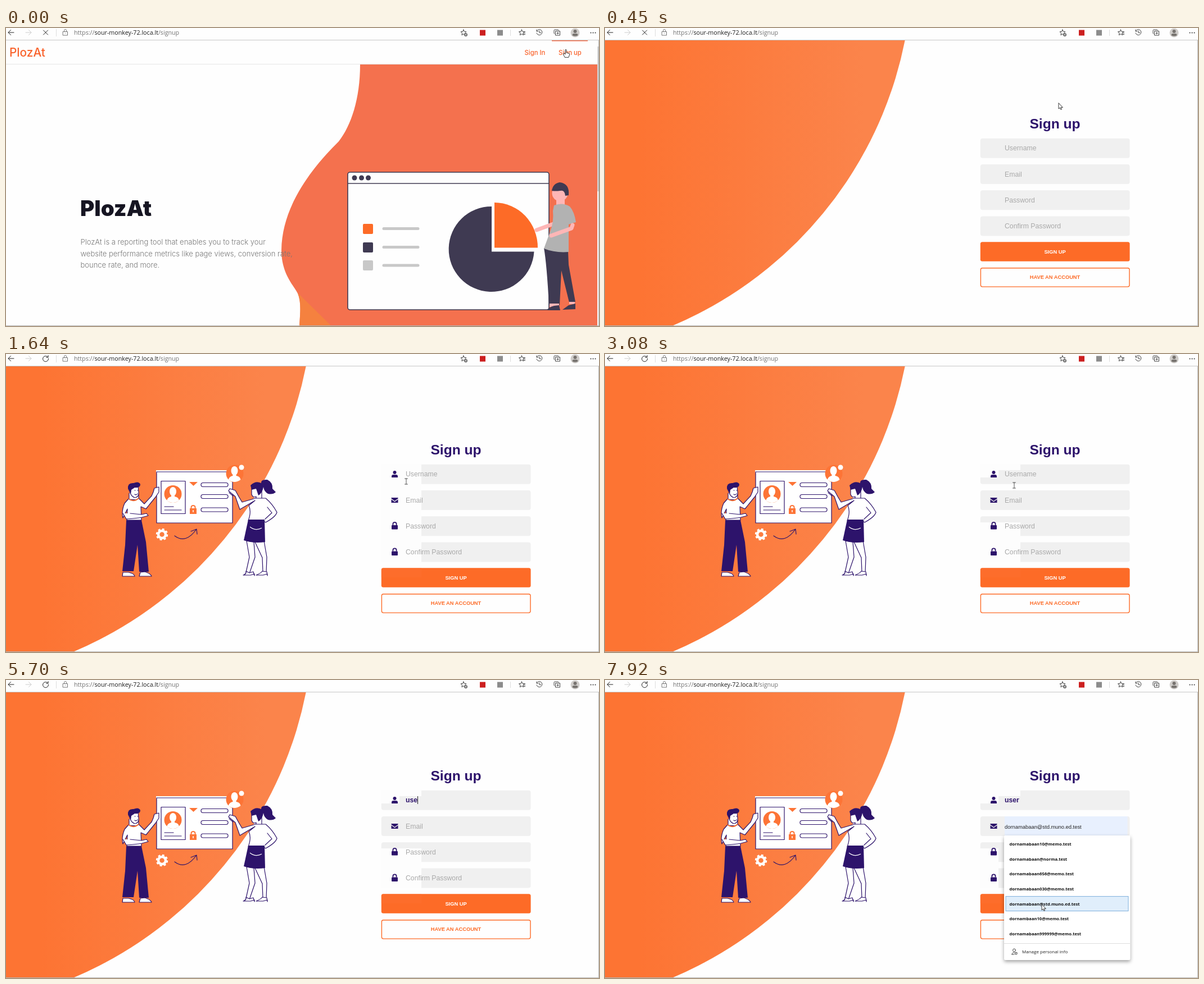
Animation, 1055 px wide and 531 px high, one loop 8000 ms. Source, as an HTML page:

```html
<!DOCTYPE html>
<html lang="en">
<head>
<meta charset="utf-8">
<title>Sign up walkthrough</title>
<style>
html, body { margin: 0; width: 100%; height: 100%; overflow: hidden; background: #fefefe; }
svg { display: block; width: 1055px; height: 531px; }
text { white-space: pre; }
.ui { font: 8px "Open Sans", "Noto Sans", sans-serif; fill: #222; }
.mails { font-size: 7.6px; font-weight: 700; fill: #111; }
.form { font: 12.25px "Liberation Sans", Arial, sans-serif; fill: #a9a9a9; }
.brand { font-family: Inter, sans-serif; }
.mid { text-anchor: middle; font-weight: 700; }
.ink { fill: #2d136b; }
.line { fill: none; stroke: #2d136b; stroke-width: 1.2; stroke-linecap: round; stroke-linejoin: round; }
.sketch { fill: #fff; stroke: #2d136b; stroke-width: 1.2; stroke-linejoin: round; stroke-linecap: round; }
.icon { fill: none; stroke: #444; stroke-width: 1; stroke-linecap: round; stroke-linejoin: round; }
.navy { fill: #3f3a52; }
.skin { fill: none; stroke: #feb6b6; stroke-width: 7; stroke-linecap: round; stroke-linejoin: round; }
.menu { filter: drop-shadow(0 3px 3px rgba(0, 0, 0, .36)); }
</style>
</head>
<body>
<svg viewBox="0 0 1055 531">
  <defs>
    <linearGradient id="sun" gradientUnits="userSpaceOnUse" x1="60" y1="0" x2="460" y2="0">
      <stop offset="0" stop-color="#fd7433"/><stop offset="1" stop-color="#fb844b"/>
    </linearGradient>
    <clipPath id="below"><rect y="22" width="1055" height="509"/></clipPath>
    <path id="star" d="M0-5 1.5-1.7 5-1.3 2.4 1 3.1 4.6 0 2.8-3.1 4.6-2.4 1-5-1.3-1.5-1.7Z"/>
    <g id="padlock"><rect x="-5.5" y="-1" width="11" height="7.5" rx="1"/><path d="M-3.1-1V-3a3.1 3.1 0 0 1 6.2 0v2" fill="none" stroke="#2d136b" stroke-width="1.8"/></g>
  </defs>
  <rect width="1055" height="531" fill="#fefefe"/>

  <g id="landing">
    <path d="M630 65C630 126 614 174 592 202C554 240 491 310 490 396C490 438 512 459 519 473C526 490 523 510 522 531H1052V65Z" fill="#f4714e"/>
    <path d="M519 472 579 531H522C523 510 526 490 519 472Z" fill="#f5813f"/>
    <rect id="smudge" x="969" y="65" width="32" height="16" fill="#f4625c"/>
    <path d="M0 64.5H1052" stroke="#e6e6e6"/>
    <path d="M971 22.5H1035" stroke="#f4714e" stroke-width="2"/>
    <path d="M1053.5 33V291" stroke="#c4c4c4" stroke-width="2"/>
    <g class="brand" fill="#f9632c">
      <text x="6" y="50.5" font-size="20.8" font-weight="500">PlozAt</text>
      <g font-size="11.3" font-weight="500"><text x="922.5" y="48">Sign In</text><text x="983" y="48">Sign up</text></g>
    </g>
    <text class="brand" x="132" y="335" font-size="38.5" font-weight="900" fill="#161522">PlozAt</text>
    <g class="brand" font-size="13" font-weight="300" fill="#777">
      <text x="132.5" y="385.5">PlozAt is a reporting tool that enables you to track your</text>
      <text x="132.5" y="406.5">website performance metrics like page views, conversion rate,</text>
      <text x="132.5" y="427">bounce rate, and more.</text>
    </g>
    <rect x="608" y="257" width="358" height="245" rx="4" fill="#fefefe" stroke="#3f3a52" stroke-width="1.6"/>
    <path d="M608 277H966" stroke="#3f3a52" stroke-width="1.6"/>
    <g class="navy"><circle cx="620" cy="267" r="4.5"/><circle cx="632.5" cy="267" r="4.5"/><circle cx="644.5" cy="267" r="4.5"/></g>
    <rect x="635" y="349" width="18" height="18" rx="2" fill="#fd6b27"/>
    <rect class="navy" x="635" y="382" width="18" height="18" rx="2"/>
    <rect x="635" y="414" width="18" height="18" rx="2" fill="#c8c8c8"/>
    <path d="M672 357.5H733M672 390.5H733M672 423H733" stroke="#c8c8c8" stroke-width="5" stroke-linecap="round"/>
    <path class="navy" d="M864 318A76 76 0 1 0 939.5 398.5H864Z"/>
    <path d="M869 311A77 80 0 0 1 946 391.5H869Z" fill="#fd6b27"/>
    <path class="skin" d="M974 349 944 360"/>
    <path d="M979 300V318H994V302" fill="#feb6b6"/>
    <circle cx="985.5" cy="294.5" r="14" fill="#feb6b6"/>
    <path class="navy" d="M971 290Q973 277 985 275Q1003 277 1001 298L995 299Q994 288 986 290Q977 291 971 290Z"/>
    <path class="navy" d="M957 392Q980 399 1000 398L1001 422 1013 488 1002 489 988 432 985 494H966Q962 420 957 392Z"/>
    <path d="M967 491H984V497H967ZM1002 488H1012V492H1002Z" fill="#feb6b6"/>
    <path class="navy" d="M963 503Q966 497 975 495L984 494 986 503ZM990 502 1001 494 1013 491V501Z"/>
    <path d="M975 316Q990 310 1003 318Q1011 327 1014 346L1001 350V399Q977 401 957 393L968 363Q975 345 973 326Z" fill="#b2b2b2"/>
    <path class="skin" d="M1008 351 1006 357 970 370"/>
  </g>

  <g id="signup" clip-path="url(#below)">
    <circle cx="-153" cy="-114" r="700" fill="url(#sun)"/>
    <g id="art">
      <path d="M267 207H403V212H267Z" fill="#fff"/>
      <rect class="sketch" x="268" y="210" width="135" height="91"/>
      <rect class="sketch" x="276" y="226.5" width="43" height="58"/>
      <circle cx="297" cy="249.5" r="15.5" fill="#fd7436"/>
      <g id="bust" fill="#fff"><ellipse cx="297" cy="245" rx="6" ry="8"/><path d="M286 261Q288 255 294 254V250H300V254Q307 255 308 261Q297 269 286 261Z"/></g>
      <path class="line" d="M282 272H298M282 278H312"/>
      <path d="M326 228H341L333.5 235Z" fill="#fd7436"/>
      <rect x="327" y="275" width="12" height="10" fill="#fd7436"/>
      <path d="M329.5 275V273a3.5 3 0 0 1 7 0v2" fill="none" stroke="#fd7436" stroke-width="2"/>
      <path d="M333 278V282" stroke="#fff" stroke-width="1.5"/>
      <g class="sketch"><rect x="347" y="229.5" width="48" height="7" rx="3.5"/><rect x="347" y="250.5" width="48" height="7" rx="3.5"/><rect x="347" y="274" width="48" height="7" rx="3.5"/></g>
      <circle cx="407" cy="213" r="15.5" fill="#fd7436"/>
      <use href="#bust" x="109.5" y="-37"/>
      <circle cx="419" cy="202" r="4.5" fill="#fff"/>
      <circle cx="277.5" cy="321.5" r="6.5" fill="none" stroke="#fff" stroke-width="4.5"/>
      <circle cx="277.5" cy="321.5" r="9.5" fill="none" stroke="#fff" stroke-width="2.5" stroke-dasharray="4 3.46"/>
      <path class="line" d="M300 324Q320 339 339 312M329 316 339 312 340 321"/>

      <path class="sketch" d="M219 248V259L236 260V250M208 389 207 396H229Q228 391 218 389ZM239 389 237 396H259Q257 391 247 388Z"/>
      <path class="sketch" d="M220 237Q219 252 229 256Q237 255 236 246L235 236Z"/>
      <path class="ink" d="M217 240Q216 229 227 230Q236 226 239 232Q239 239 229 238L223 242 222 250Z"/>
      <path class="line" d="M229 243H230M234 243H235M229 250Q232 252 234 249"/>
      <path class="sketch" d="M218 258Q227 264 236 257L246 267 259 253 262 246 264 239 272 237 272 246 266 255 249 276 240 272 241 296H215L216 276 208 292Q205 280 211 266Z"/>
      <path d="M218 258Q227 265 236 257" fill="none" stroke="#fd7436" stroke-width="2"/>
      <path class="sketch" d="M208 284 214 294Q230 293 242 291L253 288 250 284 241 286 221 284"/>
      <path class="ink" d="M214 296H241L249 335 254 388H237L234 340 227 387H207L212 340Z"/>

      <path class="sketch" d="M428 333 433 362 427 389 433 391 443 362 441 335ZM443 335 456 363 457 389 463 389 464 362 459 333Z"/>
      <path class="sketch" d="M427 387Q428 392 422 394H435L442 392V395L440 388 433 390ZM456 387Q453 391 445 394H457L465 392V395L464 388Z"/>
      <path class="sketch" d="M437 238V250Q439 257 445 254V262H455L455 242Z"/>
      <path class="ink" d="M435 234Q444 225 454 230Q453 223 465 224Q475 229 474 240L480 246Q475 251 466 249Q459 245 458 237Q456 248 449 252L445 240 437 242Z"/>
      <path class="sketch" d="M443 261 416 277 408 254 396 244 398 240 408 243 414 254 420 264 444 257H462Q474 267 482 282Q480 290 462 300L457 297H431Q437 281 432 270Z"/>
      <path class="line" d="M465 273 473 283 461 294M397 247 404 253"/>
      <path class="ink" d="M431 295H460L461 335Q441 338 423 332Z"/>
      <path d="M434 308Q444 316 455 310" fill="none" stroke="#fff" stroke-width="1.2"/>
    </g>
    <text class="form mid" x="800.5" y="178.8" style="font-size:24.6px;fill:#2d136b">Sign up</text>
    <g fill="#f0f0f0" id="fields"></g>
    <rect x="667.8" y="381.3" width="265.8" height="34.5" rx="3.5" fill="#fd6b27"/>
    <rect x="668.4" y="427.7" width="264.6" height="33.4" rx="3" fill="#fefefe" stroke="#fd6b27" stroke-width="1.4"/>
    <g class="form mid"><text x="800.5" y="401.7" style="font-size:9.3px;fill:#fff">SIGN UP</text><text x="800.5" y="447" style="font-size:9.3px;fill:#fd6b27">HAVE AN ACCOUNT</text></g>
    <path id="bleach" fill="#fdfdfd"/>
    <path id="glow" d="M671 381.300H739V398H667.800V384.500Q667.800 381.300 671 381.300Z" fill="#fd7130" fill-opacity=".5"/>
    <rect id="preview" x="711" y="243" width="218.500" height="35" fill="#e8f0fe"/>
    <g class="form">
      <text id="name" x="711" y="218">Username</text><text id="mail" x="711" y="264.5">Email</text>
      <text x="711" y="310.5">Password</text><text x="711" y="357">Confirm Password</text>
    </g>
    <path id="caret" stroke="#222" stroke-width="1"/>
    <g id="glyphs" class="ink">
      <circle cx="691.5" cy="211" r="3"/><path d="M686 220V218Q686 215 689 215H694Q697 215 697 218V220Z"/>
      <path d="M685.5 256H697.5V257.5L691.5 262 685.5 257.5ZM685.5 259 691.5 263.5 697.5 259V265H685.5Z"/>
      <use href="#padlock" x="691.5" y="306"/><use href="#padlock" x="691.5" y="352.5"/>
    </g>

    <g id="nameMenu">
      <rect class="menu" x="710" y="231" width="224.5" height="60" rx="2" fill="#fff"/>
      <path d="M710 261.5H934" stroke="#ddd"/>
      <text class="ui" x="719.5" y="249">Dornam</text>
      <path d="M916.5 246.5h.01M920 246.5h.01M923.5 246.5h.01" stroke="#222" stroke-width="2" stroke-linecap="round"/>
      <path class="icon" d="M724 280 729 275Q728 271 732 271.5L730.5 274 732 275.5 733.5 274Q734 278 730 277L725.5 281.5Z"/>
      <text class="ui" x="742" y="279.5">Manage passwords</text>
    </g>
    <g id="mailMenu">
      <rect class="menu" x="710" y="277" width="224.5" height="222" rx="2" fill="#fff"/>
      <path d="M710 469.5H934" stroke="#ddd"/>
      <rect id="pick" x="713" width="218" height="26" fill="#e0eefb" stroke="#7eb0dc"/>
      <g id="mails" class="ui mails"></g>
      <g class="icon"><circle cx="728" cy="481.5" r="2.5"/><path d="M724 489Q724 485.5 728 485.5M724 489H728M730 485.5H733V488.5H730Z"/></g>
      <text class="ui" x="742" y="487.3">Manage personal info</text>
    </g>
  </g>

  <g id="toolbar">
    <path d="M0 21.5H1055" stroke="#c6c6c6"/>
    <path class="icon" d="M4 8H14M8.5 3.5 4 8 8.5 12.5" style="stroke:#222"/>
    <path class="icon" d="M35 8H45M40.5 3.5 45 8 40.5 12.5" style="stroke:#ccc"/>
    <path id="stop" class="icon" d="M66.5 4 74.5 12M74.5 4 66.5 12" style="stroke:#222"/>
    <path id="reload" class="icon" d="M74.5 5.5A5 5 0 1 0 75.5 8M75 2.5V6H71.5" style="stroke:#222"/>
    <path d="M89.5 2V15M897.5 3V14" stroke="#ddd"/>
    <path class="icon" d="M101.5 6.5H109.5V13H101.5ZM103.5 6.5V4.5a2 2 0 0 1 4 0v2M105.5 9.5h.01" style="stroke:#777"/>
    <text class="ui" x="121" y="12.3" style="font-size:10.7px;fill:#707070">https://<tspan fill="#1d1d1d">sour-monkey-72.loca.lt</tspan>/signup</text>
    <use class="icon" href="#star" x="814" y="8"/>
    <circle cx="818" cy="12" r="3" fill="#666"/><path d="M816.5 12H819.5M818 10.5V13.5" stroke="#fff" stroke-width=".8"/>
    <rect x="843" y="3.5" width="10" height="10" fill="#cc1f1f"/>
    <rect x="874" y="3.5" width="10" height="10" fill="#8c8c8c"/>
    <use class="icon" href="#star" x="917.5" y="8"/><path d="M919.5 6.5H924M920.5 9H924M921 11.5H924" stroke="#444"/>
    <path class="icon" d="M944.5 5A5 5 0 1 1 944 9M944 3V6H947M949 5V8.5H951.5"/>
    <path class="icon" d="M978 5.5H985.5V13H978ZM976 10.5Q975 10 975 9V4.5Q975 3 976.5 3H982Q983 3 983 4M981.7 7.5V11M980 9.2H983.5"/>
    <circle cx="1012.5" cy="8.5" r="8" fill="#d0cdca"/>
    <g fill="#77736f"><circle cx="1012.5" cy="6" r="3"/><path d="M1007.5 13Q1007.5 10 1010 10H1015Q1017.5 10 1017.5 13Q1012.5 16 1007.5 13Z"/></g>
    <path d="M1040.5 8.5h.01M1044.5 8.5h.01M1048.5 8.5h.01" stroke="#333" stroke-width="2" stroke-linecap="round"/>
    <path d="M0 530.5H1055M1054.5 22V531" stroke="#b5b5b5" fill="none"/>
  </g>
  <path id="pointer" stroke-linejoin="round" stroke-linecap="round" stroke-width=".9"/>
</svg>

<script>
const LOOP = 8000;
const $ = id => document.getElementById(id);
const show = (id, on) => $(id).style.display = on ? "" : "none";
const at = (steps, t) => steps.findLast(([start]) => start <= t);

const mails = ["dornamabaan10@memo.test", "dornamabaan@norma.test", "dornamabaan656@memo.test",
  "dornamabaan030@memo.test", "dornamabaan@std.muno.ed.test", "dornambaan10@memo.test",
  "dornamabaan999999@memo.test"];
const rowY = i => 292 + 26.65 * i;
$("mails").innerHTML = mails.map((m, i) => `<text x="719.5" y="${rowY(i) + 3}">${m}</text>`).join("");
$("fields").innerHTML = [0, 1, 2, 3].map(i =>
  `<rect x="667.8" y="${196.8 + 46.2 * i}" width="265.8" height="35" rx="4"/>`).join("");

const shapes = {
  hand: ["M-3 7-5 3Q-6.5 0-4 0L-2 2V-6Q-1-7.5 0-6V-1L4 0Q6 0 5.5 3L4 7Z", "#fff", "#222"],
  arrow: ["M0 0V10L2.3 8 4 11.5 5.5 10.8 4 7.6H7Z", "#fff", "#222"],
  beam: ["M-2.5-5H2.5M0-5V5M-2.5 5H2.5", "none", "#444"],
  none: ["", "none", "none"]
};

// start, x, y, shape
const pointer = [
  [0, 997, 45, "hand"], [150, 988, 60, "hand"], [300, 972, 74, "hand"],
  [450, 807, 134, "arrow"], [600, 786, 158, "arrow"], [740, 768, 184, "arrow"],
  [890, 757, 206, "beam"], [1030, 752, 216, "beam"], [1490, 735, 222, "beam"],
  [1640, 712, 227, "beam"], [1790, 645, 242, "arrow"], [1940, 560, 262, "arrow"],
  [2090, 482, 280, "arrow"], [2240, 420, 294, "arrow"], [2380, 382, 302, "arrow"],
  [2530, 360, 306, "arrow"], [2670, 450, 307, "arrow"], [2800, 597, 304, "arrow"],
  [2940, 682, 261, "beam"], [3070, 728, 234, "beam"], [3200, 745, 222, "beam"],
  [3340, 750, 218, "beam"], [5020, 0, 0, "none"], [6510, 750, 218, "beam"],
  [6650, 742, 234, "beam"], [6790, 728, 255, "beam"], [6930, 721, 267, "beam"],
  [7350, 724, 287, "arrow"], [7490, 738, 319, "arrow"], [7640, 756, 350, "arrow"],
  [7780, 771, 384, "arrow"], [7920, 777, 400, "arrow"]
];
const typed = [[0, ""], [5020, "u"], [5140, "us"], [5700, "use"], [5950, "user"]];
const picked = [[0, -1], [7350, 0], [7490, 1], [7640, 2], [7780, 4]];
// start, x, y of the text caret; x = 0 hides it
const carets = [
  [0, 0, 0], [3600, 711.5, 207], [4130, 0, 0], [4560, 711.5, 207], [5020, 719, 207],
  [5140, 725.8, 207], [5700, 732.5, 207], [5950, 736.5, 207], [6510, 0, 0],
  [6930, 736.5, 207], [7210, 711.5, 253], [7350, 0, 0]
];
// parts of the fields that lose their grey
const bleached = [
  [0, ""],
  [1490, "M667 196H739V371H667Z"],
  [2940, "M667 196H739V207H700V220H667ZM667 300H739V371H667Z"],
  [7210, "M667 196H739V207H700V220H667ZM667 300H700V371H667Z"]
];

function render(t) {
  const loaded = t >= 1490, signup = t >= 450;
  show("landing", !signup);
  show("signup", signup);
  show("smudge", t >= 300);
  show("stop", !loaded);
  show("reload", loaded);
  for (const id of ["art", "glyphs", "glow"]) show(id, loaded);
  show("nameMenu", t >= 3600 && t < 5020);
  show("mailMenu", t >= 7210);
  $("bleach").setAttribute("d", at(bleached, t)[1]);

  const name = at(typed, t)[1];
  $("name").textContent = name || "Username";
  $("name").style.cssText = name ? "font-weight:700;fill:#2d136b" : "";

  const row = at(picked, t)[1];
  show("pick", row >= 0);
  show("preview", row >= 0);
  $("pick").setAttribute("y", rowY(Math.max(row, 0)) - 13);
  $("mail").textContent = mails[row] ?? "Email";
  $("mail").style.cssText = row >= 0 ? "font-size:9.4px;fill:#222" : "";

  const [, cx, cy] = at(carets, t);
  $("caret").setAttribute("d", cx ? `M${cx} ${cy}v14` : "");

  const [, x, y, kind] = at(pointer, t);
  const [d, fill, stroke] = shapes[kind];
  const p = $("pointer");
  p.setAttribute("d", d);
  p.setAttribute("fill", fill);
  p.setAttribute("stroke", stroke);
  p.setAttribute("transform", `translate(${x} ${y})`);
}

const began = performance.now();
function tick() {
  render((performance.now() - began) % LOOP);
  requestAnimationFrame(tick);
}
tick();
</script>
</body>
</html>
```
